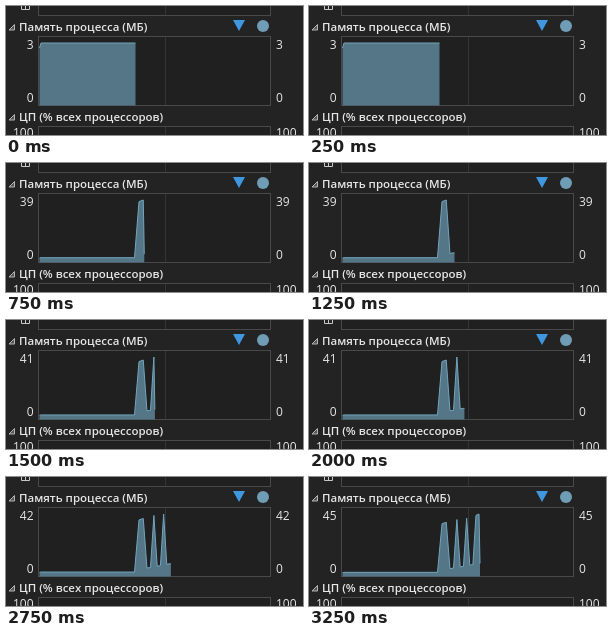
Animation of 297 by 129 pixels, one loop 3.5 s. Source, as an HTML page:

```html
<!DOCTYPE html>
<html lang="ru">
<head>
<meta charset="utf-8">
<title>Память процесса</title>
<style>
  html, body { margin: 0; width: 100%; height: 100%; overflow: hidden; background: #232323; }
  svg { display: block; width: 297px; height: 129px; }
  text { font: 12px "Open Sans", "Noto Sans", sans-serif; fill: #e6e6e6; }
  .title { font-size: 11.5px; font-weight: 600; }
  .end { text-anchor: end; }
  .box { fill: #202020; stroke: #49494c; }
  .grid { stroke: #343436; }
  .fold { fill: #555; stroke: #b4b4b4; }
</style>
</head>
<body>
<svg viewBox="0 0 297 129">
  <rect width="297" height="129" fill="#232323"/>

  <rect class="box" x="32.5" y="-20.5" width="232" height="30"/>
  <path class="grid" d="M159.5 0V9"/>
  <path d="M15.5 0V3.5H23.5V0M19.5 0V3.5" fill="none" stroke="#c8c8c8"/>

  <path class="fold" d="M8.5 18.5V24H3Z"/>
  <text class="title" x="13" y="24.5">Память процесса (МБ)</text>
  <path d="M227 14H239L233 25Z" fill="#3f97e0"/>
  <circle cx="257" cy="20" r="6" fill="#6f9db5"/>

  <rect class="box" x="32.5" y="30.5" width="232" height="69"/>
  <path class="grid" d="M159.5 31V99"/>
  <path id="area" fill="#557687"/>
  <path id="line" fill="none" stroke="#70a5be" stroke-linejoin="round"/>
  <text id="maxL" class="end" x="27.5" y="43"></text>
  <text id="maxR" x="270" y="43"></text>
  <text class="end" x="27.5" y="96">0</text>
  <text x="270" y="96">0</text>

  <path class="fold" d="M8.5 108.5V114H3Z"/>
  <text class="title" x="13" y="115">ЦП (% всех процессоров)</text>
  <rect class="box" x="32.5" y="120.5" width="232" height="30"/>
  <path class="grid" d="M159.5 121V129"/>
  <text class="end" x="27.5" y="131">100</text>
  <text x="270" y="131">100</text>
</svg>
<script>
  const STEP = 250, COUNT = 14, QUIET = 2, LAST = COUNT - QUIET - 1;
  const BASE = 99.5, HEIGHT = 62.5, IDLE = 3;

  // reading n: place on the time axis, level after cleanup, level in a burst
  const place = n => 133 + 37 * (n / LAST) ** 0.9;
  const low = n => 4.8 + 0.42 * n;
  const high = n => Math.round(38 + 7 * n / LAST);
  const isBurst = n => n % 3 === 1 || n === 0 || n === LAST;

  const el = id => document.getElementById(id);
  const area = el("area"), line = el("line"), labels = [el("maxL"), el("maxR")];
  let shown = -1;

  function draw(i) {
    const newest = i - QUIET;
    const points = [[33.5, 0.92 * IDLE], [35, IDLE], [128.5, IDLE]];
    for (let n = 0; n <= newest; n++) points.push([place(n), isBurst(n) ? high(n) : low(n)]);
    const tip = newest < 0 ? 129.5 + i : place(newest) + 1;
    points.push([tip, newest < 0 ? IDLE : low(newest)]);

    const max = Math.max(...points.map(p => p[1]));
    const path = points.map(([x, v]) => x + " " + (BASE - HEIGHT * v / max).toFixed(2)).join("L");
    line.setAttribute("d", "M" + path);
    area.setAttribute("d", `M33.5 ${BASE}L${path}L${tip} ${BASE}Z`);
    labels.forEach(t => t.textContent = max);
  }

  function tick() {
    const i = Math.floor(performance.now() / STEP) % COUNT;
    if (i !== shown) draw(shown = i);
    requestAnimationFrame(tick);
  }
  tick();
</script>
</body>
</html>
```
